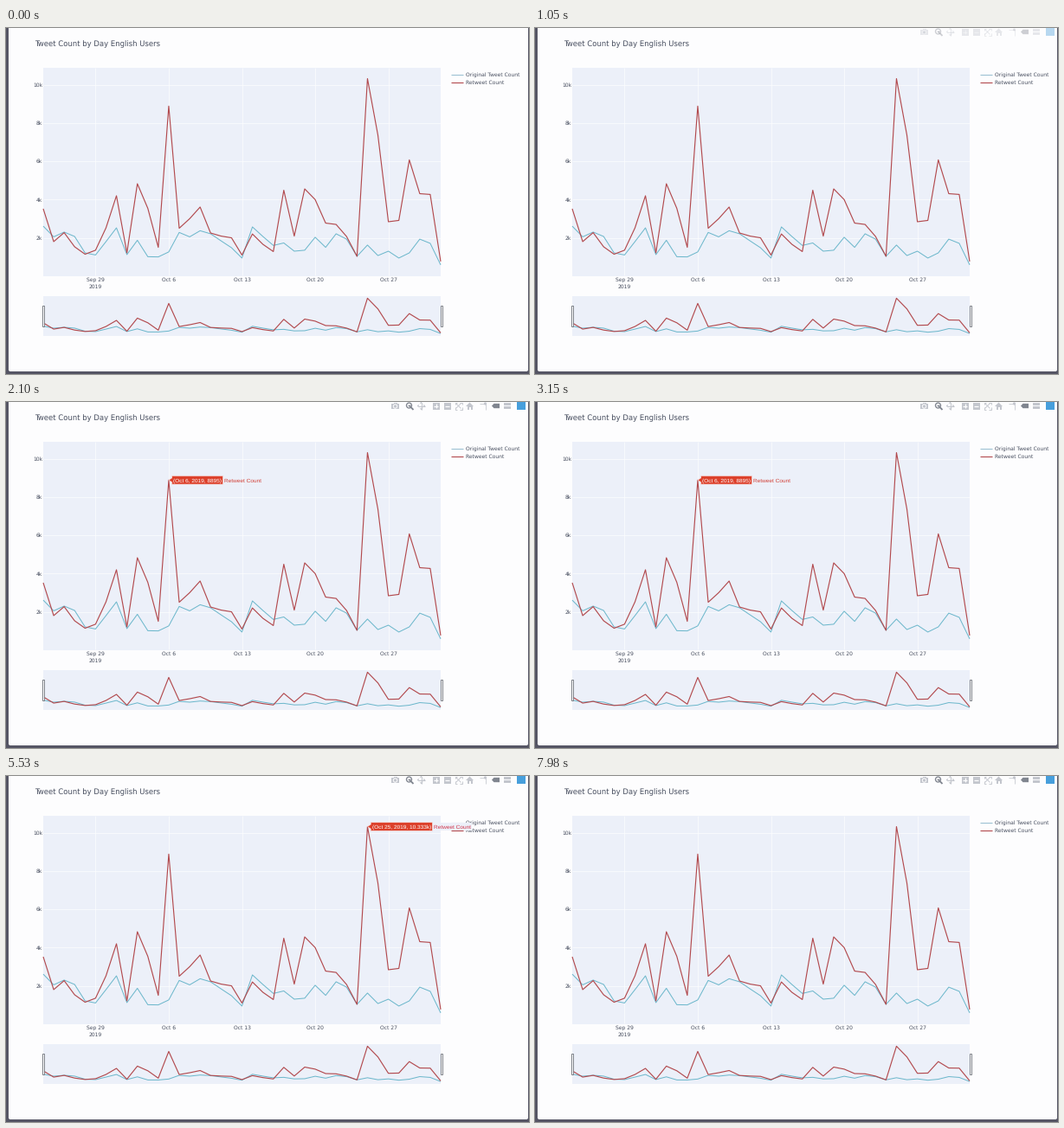
Recreate the animation shown at these times as a matplotlib script. Size 604 by 400 pixels, loop 8000 ms.

```python
import numpy as np
import matplotlib.pyplot as plt
from matplotlib.animation import FuncAnimation
from matplotlib.patches import Circle, FancyBboxPatch, Polygon, Rectangle

W, H, DPI = 604, 400, 100
LOOP, STEP = 8000, 40
PT = 72 / DPI

PAPER, PLOT_BG, EDGE = "#fdfdfe", "#ecf0f9", "#555564"
INK, RED, BLUE = "#464d5e", "#b2494d", "#6bb7cb"
ICON, ICON_ON = "#c3c6cd", "#80858f"
TIP, LOGO = "#dc402b", "#479fdc"

LEFT, RIGHT, TOP, BASE = 43, 502, 46, 286.7
SLIDER_TOP, SLIDER_BASE = 310, 355.6
Y_MAX = 10900

RETWEETS = np.array([
    3520, 1800, 2270, 1530, 1140, 1350, 2520, 4200, 1210, 4830, 3540, 1500, 8895,
    2500, 3000, 3610, 2250, 2090, 2000, 1100, 2200, 1660, 1280, 4490, 2090, 4560,
    4000, 2770, 2700, 2070, 1030, 10333, 7370, 2840, 2910, 6080, 4310, 4270, 760])
ORIGINALS = np.array([
    2610, 2050, 2300, 2070, 1210, 1100, 1800, 2520, 1120, 1870, 1010, 1000, 1260,
    2280, 2050, 2370, 2210, 1840, 1480, 940, 2570, 2070, 1600, 1730, 1300, 1350,
    2030, 1500, 2210, 1930, 1030, 1620, 1070, 1300, 940, 1210, 1930, 1710, 580])
DAYS = np.linspace(LEFT, RIGHT, len(RETWEETS))

plt.rcParams["text.hinting"] = "none"
fig = plt.figure(figsize=(W / DPI, H / DPI), dpi=DPI, facecolor=EDGE)
ax = fig.add_axes([0, 0, 1, 1])
ax.set(xlim=(0, W), ylim=(H, 0))
ax.axis("off")


def line(xs, ys, color, width=1.0, z=3):
    return ax.plot(xs, ys, color=color, lw=width * PT, zorder=z,
                   solid_joinstyle="round", solid_capstyle="butt")[0]


def rect(x0, y0, x1, y1, color, z=1, **kw):
    kw.setdefault("lw", 0)
    return ax.add_patch(Rectangle((x0, y0), x1 - x0, y1 - y0, fc=color, zorder=z, **kw))


def text(x, y, s, size=6.0, color=INK, ha="left", font="DejaVu Sans", z=4):
    return ax.text(x, y, s, fontsize=size * PT, color=color, ha=ha,
                   va="baseline", family=font, zorder=z)


def scale(values, top, base):
    return base - values / Y_MAX * (base - top)


def draw_page():
    ax.add_patch(FancyBboxPatch((5, -8), 596, 403, fc=PAPER, lw=0, zorder=0,
                                boxstyle="round,pad=2,rounding_size=2"))
    text(33, 20.8, "Tweet Count by Day English Users", 8.55)


def draw_chart():
    rect(LEFT, TOP, RIGHT, 286.5, PLOT_BG)
    labels = ["Sep 29", "Oct 6", "Oct 13", "Oct 20", "Oct 27"]
    for x, label in zip(DAYS[5::7], labels):
        line([x, x], [TOP, 286], "white", 0.6, 2)
        text(x, 293.2, label, ha="center")
    text(DAYS[5], 300.9, "2019", ha="center")
    for k in range(2, 11, 2):
        y = scale(k * 1000, TOP, BASE)
        line([LEFT, RIGHT], [y, y], "white", 0.6, 2)
        text(42.3, y + 2.2, f"{k}k", ha="right")
    line(DAYS, scale(ORIGINALS, TOP, BASE), BLUE)
    line(DAYS, scale(RETWEETS, TOP, BASE), RED, 1.15)


def draw_slider():
    rect(LEFT, SLIDER_TOP, RIGHT, 355.5, PLOT_BG)
    line(DAYS, scale(ORIGINALS, SLIDER_TOP, SLIDER_BASE), BLUE)
    line(DAYS, scale(RETWEETS, SLIDER_TOP, SLIDER_BASE), RED, 1.15)
    for x in (LEFT - 0.5, RIGHT + 0.5):
        rect(x - 1, 321, x + 1, 344.5, "white", 4, ec="#62666f", lw=0.8 * PT)


def draw_legend():
    for y, name, color in ((53.5, "Original Tweet Count", "#9cc2d3"),
                           (63, "Retweet Count", RED)):
        line([514, 528], [y, y], color, 1.1)
        text(531, y + 2.4, name)


def draw_toolbar():
    y = 4.5
    parts = []

    def box(x, dy, w, h, color=ICON):
        parts.append(rect(x - w / 2, y + dy - h / 2, x + w / 2, y + dy + h / 2, color, 5))

    def stroke(xs, ys, color=ICON, width=1.1):
        parts.append(line(xs, np.add(ys, y), color, width, 6))

    def dot(x, dy, r, color, **kw):
        parts.append(ax.add_patch(Circle((x, y + dy), r, color=color, zorder=6, **kw)))

    def shape(points, color):
        pts = np.array(points) + [0, y]
        parts.append(ax.add_patch(Polygon(pts, fc=color, lw=0, zorder=5)))

    # camera
    box(449.5, 0.5, 9, 6)
    box(449.5, -3, 4, 1.5)
    dot(449.5, 0.5, 2, PAPER)
    dot(449.5, 0.5, 1, ICON)
    # zoom
    dot(465.5, -0.5, 3, ICON_ON, fill=False, lw=1.3 * PT)
    stroke([467.5, 470.5], [1.5, 4.5], ICON_ON, 1.8)
    stroke([464, 467], [-0.5, -0.5], ICON_ON)
    stroke([465.5, 465.5], [-2, 1], ICON_ON)
    # pan
    stroke([475.5, 483.5], [0, 0])
    stroke([479.5, 479.5], [-4, 4])
    for dx, dy in ((1, 0), (-1, 0), (0, 1), (0, -1)):
        shape([(479.5 + 4.8 * dx, 4.8 * dy),
               (479.5 + 2.8 * dx + 1.8 * dy, 2.8 * dy + 1.8 * dx),
               (479.5 + 2.8 * dx - 1.8 * dy, 2.8 * dy - 1.8 * dx)], ICON)
    # zoom in and out
    for x in (496.5, 509.5):
        box(x, 0, 8, 8)
        stroke([x - 2.5, x + 2.5], [0, 0], "white", 1.3)
    stroke([496.5, 496.5], [-2.5, 2.5], "white", 1.3)
    # autoscale
    for s in (-1, 1):
        stroke([519.5, 525.5], [-3 * s, 3 * s], width=0.9)
        for c in (-1, 1):
            stroke([522.5 + 1.5 * s, 522.5 + 4 * s, 522.5 + 4 * s],
                   [4 * c, 4 * c, 1.5 * c], width=0.9)
    # home
    shape([(531, 0.5), (535.5, -4), (540, 0.5)], ICON)
    shape([(532.5, 0), (538.5, 0), (538.5, 4), (536.5, 4), (536.5, 1.5),
           (534.5, 1.5), (534.5, 4), (532.5, 4)], ICON)
    # spike lines
    stroke([547, 553.5], [-2.5, -2.5], width=0.8)
    stroke([553.5, 553.5], [-2.5, 4], width=0.8)
    dot(553.5, -2.5, 0.9, ICON)
    # hover modes
    shape([(561, 0), (563.5, -2.7), (570, -2.7), (570, 2.7), (563.5, 2.7)], ICON_ON)
    box(578.5, -2, 8, 3)
    box(578.5, 2, 8, 3)
    # badge
    box(595.2, -0.2, 9.5, 9.5, LOGO)
    return parts


def draw_tip(day, label, x_end, name_color, halo):
    """Hover label with an arrow pointing at the given day's value."""
    x, y = DAYS[day], scale(RETWEETS[day], TOP, BASE)
    x0, y0, y1 = x + 3.8, y - 4.8, y + 4.8
    outline = [(x, y), (x0, y - 2.5), (x0, y0), (x_end, y0),
               (x_end, y1), (x0, y1), (x0, y + 2.5)]
    parts = [ax.add_patch(Polygon(outline, fc=TIP, ec="#f8dcd9", lw=0.6 * PT, zorder=8)),
             text(x + 5.3, y + 2.3, label, 6.5, "white", font="Liberation Sans", z=9),
             text(x_end + 1.3, y + 2.3, "Retweet Count", 6.5, name_color,
                  font="Liberation Sans", z=9)]
    if halo:
        parts.append(rect(x_end, y - 4.6, x_end + 46, y + 4.8, PLOT_BG, 7))
    return parts


draw_page()
draw_chart()
draw_slider()
draw_legend()
toolbar = draw_toolbar()
tips = [
    (2100, 3220, draw_tip(12, "(Oct 6, 2019, 8895)", 250.5, "#d23f36", False)),
    (4130, 6300, draw_tip(31, "(Oct 25, 2019, 10.333k)", 492.3, "#d2354a", True)),
]


def update(i):
    t = i * STEP
    u = np.clip((t - 880) / 380, 0, 1)
    for part in toolbar:
        part.set_alpha(u * u * (3 - 2 * u))
    for start, end, parts in tips:
        for part in parts:
            part.set_visible(start <= t + STEP / 2 < end)
    return []


anim = FuncAnimation(fig, update, frames=LOOP // STEP, interval=STEP,
                     repeat=True, repeat_delay=0, blit=False)
plt.show()
```
